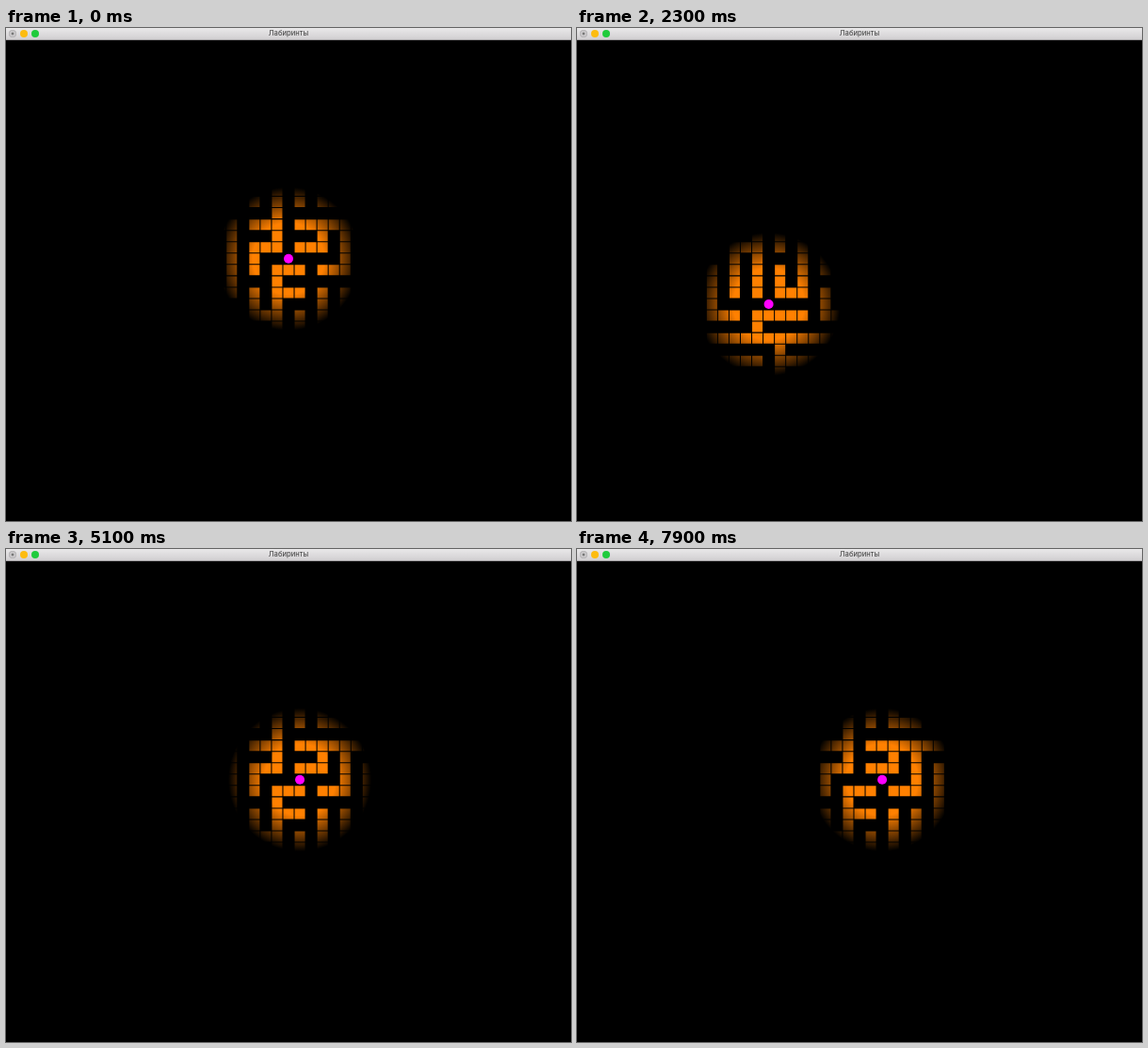
Write an HTML page with a canvas that moves like this. It is 600 by 523 pixels and loops after 8 s.

```html
<!DOCTYPE html>
<html lang="ru">
<head>
<meta charset="utf-8">
<title>Лабиринты</title>
<style>
  html, body { margin: 0; width: 100%; height: 100%; overflow: hidden; background: #000; }
  canvas { position: absolute; left: 0; top: 0; }
  header {
    position: absolute; left: 0; top: 0; width: 600px; height: 13px; box-sizing: border-box;
    background: linear-gradient(#e9e8e9, #d2d0d2); border-bottom: 1px solid #a3a1a3;
    font: 7.7px/12px Inter, Roboto, sans-serif; color: #3c3c3c; text-align: center;
  }
  i { position: absolute; top: 2px; width: 8px; height: 8px; border-radius: 50%; }
  .close { left: 3px; background: radial-gradient(circle, #777 1px, #cfcdcf 1.8px, #c6c4c6 3px, #aaa8aa 4px); }
  .fold { left: 15px; background: #fdbc10; }
  .grow { left: 27px; background: #1fcb3c; }
</style>
</head>
<body>
<canvas id="stage" width="600" height="523"></canvas>
<header><i class="close"></i><i class="fold"></i><i class="grow"></i>Лабиринты</header>
<script>
const LOOP = 8000, TICK = 100;
const PITCH = 12.05, CELL = 11, RADIUS = 76;
const HOME = { x: 300, y: 244.8 };

// Walls; the walker's first cell is column 13, row 6.
const HOME_COL = 13, HOME_ROW = 6;
const maze = [
  "............#.#.#........",
  "..........#.#.#.###......",
  "............#............",
  ".......##.###.#######.#..",
  "....#.#.#...#...#.#...#..",
  "..###.#.#.###.###.#.#.#..",
  "..#.#...#.#.......#.#.#.#",
  "#.#.#.#.#.#.###.###.#.#.#",
  "#.#.#.#.#...#.......#.#.#",
  "#.#.#.###.#.###.#.#.#.#.#",
  "#.........#.#...#.#.#.#.#",
  "###.#####.###.#.#.#.#.#..",
  "....#.......#.#.#.#.#....",
  "#####################....",
  "......#...........#......",
  ".####.#####..............",
  "......#.................."
];

// Legs of the walk: time of the first step, time between steps, directions.
const legs = [
  [180, 180, "LLDDLLDDLLLL"],
  [2700, 180, "RRRRUU"],
  [3960, 180, "RRUURRRRDDRRR"],
  [6400, 0, "R"],
  [7015, 175, "LLLLUU"]
];
const dirs = { L: [-1, 0], R: [1, 0], U: [0, -1], D: [0, 1] };
const ctx = document.getElementById("stage").getContext("2d");

const toX = col => HOME.x + col * PITCH;
const toY = row => HOME.y + row * PITCH;

const walls = new Path2D();
maze.forEach((line, row) => [...line].forEach((mark, col) => {
  if (mark === "#") {
    walls.rect(toX(col - HOME_COL) - CELL / 2, toY(row - HOME_ROW) - CELL / 2, CELL, CELL);
  }
}));

function walkerAt(time) {
  let col = 0, row = 0;
  for (const [start, gap, steps] of legs) {
    [...steps].forEach((step, n) => {
      if (start + n * gap > time) return;
      col += dirs[step][0];
      row += dirs[step][1];
    });
  }
  return [toX(col), toY(row)];
}

function draw(time) {
  const [x, y] = walkerAt(time);
  ctx.fillStyle = "#000";
  ctx.fillRect(0, 0, 600, 523);

  const light = ctx.createRadialGradient(x, y, 0, x, y, RADIUS);
  light.addColorStop(0, "#ff8000");
  light.addColorStop(0.5, "#ff8000");
  light.addColorStop(1, "#000");
  ctx.fillStyle = light;
  ctx.fill(walls);

  ctx.fillStyle = "#f0f";
  ctx.beginPath();
  ctx.arc(x, y, 5, 0, Math.PI * 2);
  ctx.fill();
}

const begin = performance.now();
function frame() {
  const time = (performance.now() - begin) % LOOP;
  draw(Math.floor(time / TICK) * TICK);
  requestAnimationFrame(frame);
}
frame();
</script>
</body>
</html>
```
